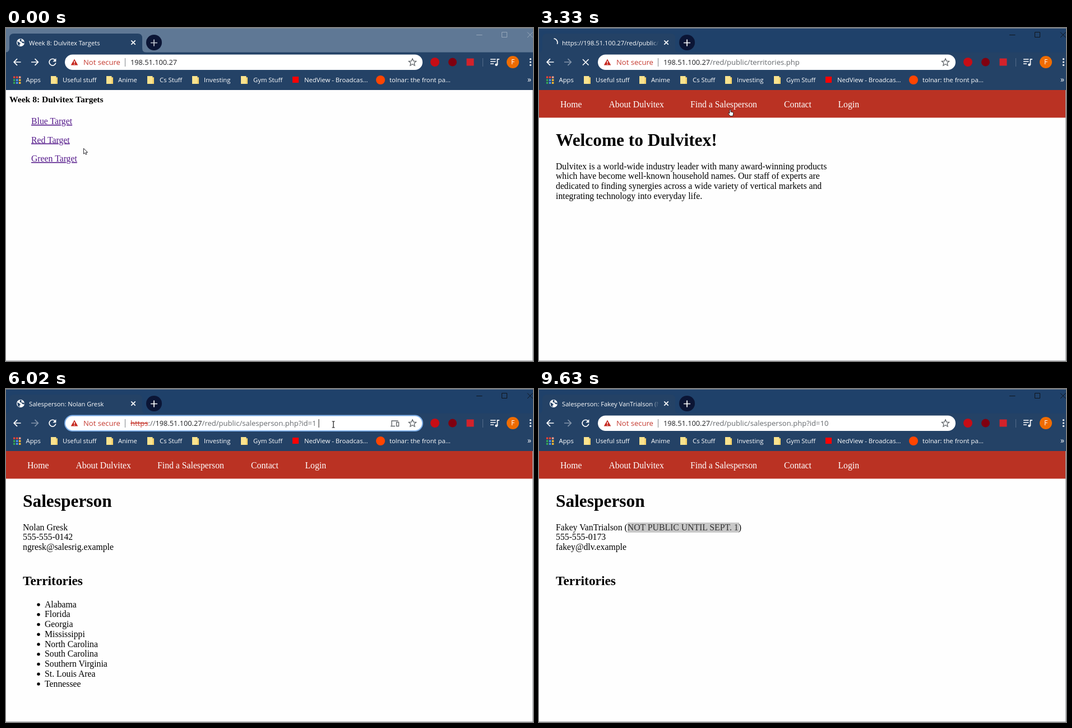
Write an HTML page that moves like this. It is 940x596 px and loops after 9730 ms.

```html
<!DOCTYPE html>
<html lang="en">
<head>
<meta charset="utf-8">
<title>Browser walkthrough</title>
<style>
  html, body { margin: 0; width: 100%; height: 100%; overflow: hidden; background: #fefefe; }
  svg { display: block; width: 100%; height: 100%; }
  text { white-space: pre; }
  .ui { font-family: "Open Sans", "Noto Sans", sans-serif; }
  .page { font-family: "Liberation Serif", "Times New Roman", serif; }
  .line { fill: none; stroke: #fff; stroke-width: 1.7; }
</style>
</head>
<body>
<svg id="stage" viewBox="0 0 940 596"></svg>
<script>
const LOOP = 9730;
const HOST = '198.51.100.27';
const BODY = 15.75, LEADING = 17.75;
const SELLER = 'Nolan Gresk', HIDDEN = 'Fakey VanTrialson';
const HIDDEN_LINE = `${HIDDEN} (NOT PUBLIC UNTIL SEPT. 1)`;

const text = (x, y, size, str, attrs = '') =>
  `<text x="${x}" y="${y}" font-size="${size}" ${attrs}>${str}</text>`;
const rect = (x, y, w, h, fill, attrs = '') =>
  `<rect x="${x}" y="${y}" width="${w}" height="${h}" fill="${fill}" ${attrs}/>`;
const circle = (x, y, r, fill, attrs = '') =>
  `<circle cx="${x}" cy="${y}" r="${r}" fill="${fill}" ${attrs}/>`;
const path = (d, attrs = 'class="line"') => `<path d="${d}" ${attrs}/>`;
const group = (id, content, attrs = '') => `<g id="${id}" ${attrs}>${content}</g>`;
const lines = (x, y, rows) => rows.map((row, i) => text(x, y + i * LEADING, BODY, row)).join('');
const heading = str => text(30, 211, 31.4, str, 'font-weight="bold"');
const link = (x, y, str, color = '#0000ee') =>
  text(x, y, BODY, str, `fill="${color}" text-decoration="underline"`);

// Browser frame
const folders = [[80, 101, 'Useful stuff'], [179, 200, 'Anime'], [252, 274, 'Cs Stuff'],
  [332, 353, 'Investing'], [419, 441, 'Gym Stuff']];
const dotColors = ['#e94335', '#e94335', '#f4a08c', '#34a853', '#4f93f7', '#f9bb2d', '#34a853', '#4f93f7', '#f9bb2d'];

function bookmarks() {
  const apps = dotColors.map((c, i) => rect(13 + i % 3 * 5, 86.5 + Math.floor(i / 3) * 5, 3.4, 3.4, c)).join('');
  const items = folders.map(([ix, tx, name]) =>
    path(`M${ix} 86h9.5v2.5h2.5v11.5h-12z`, 'fill="#fbe38e"') +
    path(`M${ix + 9.5} 88.5h2.5v11.5h-3z`, 'fill="#f3d06b"') + text(tx, 97, 11.3, name)).join('');
  return apps + text(35.5, 97, 11.3, 'Apps') + items +
    rect(511, 87, 11, 11, '#f00') + text(532, 97, 11.3, 'NedView - Broadcas...') +
    circle(668, 93, 8, '#ff4500') + text(684, 97, 11.3, 'tolnar: the front pa...') +
    text(930, 97, 14, '»');
}

function toolbar() {
  return path('M26.5 61H14.5M20 55.2L14.2 61L20 66.8') +
    path('M45 61H57M51.5 55.2L57.3 61L51.5 66.8', 'id="forward" class="line"') +
    group('reload', path('M87.6 57.4A5.9 5.9 0 1 0 88.8 62.4') + path('M89.4 54.3v6h-6z', 'fill="#fff"')) +
    group('stop', path('M78 56l10.500 10.500M88.500 56L78 66.500')) +
    circle(765, 61, 8, '#c70d15') + circle(796.5, 61, 7.5, '#800010') + rect(821.5, 54.5, 13, 13, '#d3222a') +
    rect(850, 54, 1, 15, '#546c8a') +
    path('M864 56h9.500M864 60h9.500M864 64h6M876.500 66V55.800h3.500') + circle(874.6, 65.8, 2.3, '#fff') +
    circle(904, 61, 11, '#ef6c00') + text(904, 65.3, 12, 'F', 'text-anchor="middle"') +
    [55.7, 61, 66.3].map(y => circle(935.5, y, 1.6, '#fff')).join('');
}

function popup() {
  const row = (y, str) => text(138, y, 13.05, str, 'fill="#3c4043"');
  return rect(97, 42, 654, 118, '#fff', 'rx="14" style="filter:drop-shadow(0 2px 3px #0006)"') +
    rect(97, 82, 654, 36, '#e8eaed') + circle(122, 100, 6, '#5f6368') +
    row(104.5, `${HOST}/red/public/salesperson.php?id=10`) +
    circle(121, 135, 4.3, 'none', 'stroke="#5f6368" stroke-width="1.6"') +
    path('M124 138l4 4', 'stroke="#5f6368" stroke-width="1.6"') +
    row(140.5, `${HOST}/red/public/salesperson.php?id=10 - Search`);
}

function addressBar() {
  return rect(105, 47.5, 638, 27.5, '#fff', 'id="bar" rx="13.75"') +
    path('M122 55.500L128.300 66.500H115.700z', 'fill="#c5281f"') +
    rect(121.3, 59, 1.4, 4, '#fff') + rect(121.3, 64, 1.4, 1.4, '#fff') +
    text(138, 66, 13.05, 'Not secure', 'fill="#c53a30"') + rect(212, 54, 1, 15, '#80868b') +
    rect(222, 52, 335, 19, '#3390ff', 'id="urlMark"') +
    '<text id="url" x="222" y="66"></text>' + rect(557.5, 54, 1, 15, '#222', 'id="caret"') +
    group('devices', path('M688 65.500V57h11.500M686 66.500h8M696.500 59.500h4v7h-4z', 'fill="none" stroke="#5f6368" stroke-width="1.4"')) +
    path('M725 54.800l1.900 4.300 4.700.4-3.500 3.100 1 4.600-4.100-2.400-4.100 2.400 1-4.600-3.500-3.100 4.700-.4z',
      'fill="none" stroke="#5f6368" stroke-width="1.3"');
}

function tabStrip() {
  return rect(0, 0, 940, 46, '#5f7895', 'id="strip"') +
    path('M-2 44Q6 44 6 36V18Q6 10 14 10H235Q243 10 243 18V36Q243 44 251 44Z', 'fill="#244266"') +
    group('globe', circle(26, 26, 7, '#fff') +
      path('M20 24l3.500 1.500 2.500 2.500-2 1.500.5 2.700-3.200-2zM25 19.500l3 1-1 2.500 3 1.500 2.500 0 .3 3-3.300-.5-2-2.500-3-1z', 'fill="#244266"')) +
    path('', 'id="spinner" class="line"') +
    `<clipPath id="tabClip">${rect(40, 12, 173, 30, '#000')}</clipPath>` +
    text(41, 30.5, 11.2, '', 'id="tab" fill="#fff" clip-path="url(#tabClip)"') +
    '<linearGradient id="fade"><stop stop-color="#244266" stop-opacity="0"/><stop offset="1" stop-color="#244266"/></linearGradient>' +
    rect(200, 14, 14, 24, 'url(#fade)') +
    path('M223.300 22.300l7.400 7.400M230.700 22.300l-7.400 7.400', 'class="line"') +
    circle(264, 26, 14, '#0b1535') + path('M258 26.500h12M264 20.500v12', 'id="plus" class="line"') +
    path('M839 12.500h10.500M884.500 7.500h9v9h-9zM930 7.500l9.500 9.500M939.500 7.500l-9.500 9.500', 'id="buttons" fill="none"');
}

// Page contents
function targets() {
  return text(6, 133, 15.6, 'Week 8: Dulvitex Targets', 'font-weight="bold"') +
    ['Blue', 'Red', 'Green'].map((c, i) => link(45, 172 + 33.5 * i, c + ' Target', '#551a8b')).join('');
}

function nav() {
  const items = [[38, 'Home'], [124.5, 'About Dulvitex'], [270, 'Find a Salesperson'], [437, 'Contact'], [533.5, 'Login']];
  return rect(0, 111, 939, 49.5, '#ba3223') +
    items.map(([x, name]) => text(x, 142.3, BODY, name, 'fill="#fff"')).join('');
}

function home() {
  return heading('Welcome to Dulvitex!') + lines(30, 252.5, [
    'Dulvitex is a world-wide industry leader with many award-winning products',
    'which have become well-known household names. Our staff of experts are',
    'dedicated to finding synergies across a wide variety of vertical markets and',
    'integrating technology into everyday life.']);
}

function territories() {
  const square = y => rect(55.3, y - 7, 5.3, 5.3, '#000');
  const states = [['Alabama (AL)', SELLER], ['Alaska (AK)', 'Gerald Fostwind'],
    ['Arizona (AZ)', 'Clara Tovnil'], ['Arkansas (AR)', 'Philippa Renwo']];
  const regions = [['Northern California', 'Gerald Fostwind'], ['Southern California', 'Joanna Kestrin']];
  return heading('Find a Salesperson') +
    lines(30, 252.5, ['Use the list below to find a salesperson nearby. We are ready to serve you!']) +
    text(30, 286.3, BODY, 'UNITED STATES', 'font-weight="bold"') +
    states.map(([state, name], i) => {
      const y = 319.7 + 51.3 * i;
      return text(30, y, BODY, state) + square(y + LEADING) + link(69, y + LEADING, name);
    }).join('') + text(30, 525, BODY, 'California (CA)') +
    regions.map(([region, name], i) => {
      const y = 542.7 + 2 * LEADING * i;
      return square(y) + text(69, y, BODY, region) + link(69, y + LEADING, name);
    }).join('');
}

function person(details, areas) {
  return heading('Salesperson') + lines(30, 252.5, details) +
    text(30, 351, 23.4, 'Territories', 'font-weight="bold"') + lines(69, 390.7, areas) +
    areas.map((_, i) => circle(58, 386 + LEADING * i, 2.7, '#000')).join('');
}

const pages = {
  targets: targets(),
  home: home(),
  list: territories(),
  seller: person([SELLER, '555-555-0142', 'ngresk@salesrig.example'],
    ['Alabama', 'Florida', 'Georgia', 'Mississippi', 'North Carolina', 'South Carolina',
      'Southern Virginia', 'St. Louis Area', 'Tennessee']),
  hidden: person([HIDDEN_LINE, '555-555-0173', 'fakey@dlv.example'], []) +
    `<clipPath id="markClip">${rect(158, 239, 0, 18, '#000', 'id="markArea"')}</clipPath>` +
    group('marked', rect(158, 239, 199, 18, '#3390ff', 'id="markFill"') +
      text(30, 252.5, BODY, HIDDEN_LINE, 'id="markText"'), 'clip-path="url(#markClip)"')
};

const outline = 'fill="#fff" stroke="#16161c" stroke-width=".9" stroke-linejoin="round"';
const cursors = {
  arrow: path('M.5.500V10.300L2.800 8.300 4.300 11.600 6 10.800 4.600 7.600H7.600z', outline),
  hand: path('M3 1Q4 0 5 1V5L9 6Q10 6.500 9.700 8L8.700 12.500H4L.8 8.300Q.5 6.800 2 7L3 8z', outline),
  ibeam: path('M-2.500-5.500H2.500M0-5.500V5.500M-2.500 5.500H2.500', 'fill="none" stroke="#111" stroke-width="1.2"')
};

const stage = document.getElementById('stage');
stage.innerHTML =
  rect(0, 0, 940, 596, '#fefefe') +
  group('pages', group('nav', nav()) + Object.entries(pages).map(([id, body]) => group('page-' + id, body)).join(''), 'class="page"') +
  group('frame', tabStrip() + rect(0, 43.5, 940, 67.5, '#244266') + toolbar() + bookmarks() +
    group('popup', popup()) + addressBar(), 'class="ui" fill="#fff"') +
  rect(0, 0, 940, 1, '#7d8894') + rect(939, 111, 1, 485, '#a5a9ad') + rect(0, 595, 940, 1, '#a5a9ad') +
  Object.entries(cursors).map(([id, shape]) => group('cursor-' + id, shape)).join('');

const $ = id => document.getElementById(id);
const show = (id, on) => { $(id).style.display = on ? '' : 'none'; };
const set = (id, attrs) => { for (const k in attrs) $(id).setAttribute(k, attrs[k]); };

// Timeline: each entry holds until the next one
const loadingTab = `https://${HOST}/red/public/`;
const salesPath = '/red/public/salesperson.php?id=1';
const steps = [
  [0, { page: 'targets', tab: 'Week 8: Dulvitex Targets', path: '', active: false, load: null, bar: 'idle', mark: '#3390ff' }],
  [840, { active: true }],
  [980, { load: 980, tab: loadingTab, path: '/red/public/' }],
  [1120, { load: null, tab: 'Dulvitex', page: 'home' }],
  [3030, { load: 3030, tab: loadingTab, path: '/red/public/territories.php' }],
  [3450, { load: null, tab: 'Find a Salesperson', page: 'list' }],
  [4490, { load: 4490, tab: loadingTab, path: salesPath }],
  [4780, { load: null, tab: 'Salesperson: ' + SELLER, page: 'seller' }],
  [5060, { bar: 'hover' }],
  [5340, { bar: 'selected' }],
  [6020, { bar: 'edit' }],
  [6550, { bar: 'popup', path: salesPath + '0' }],
  [7110, { bar: 'idle', load: 7110, tab: loadingTab }],
  [7390, { load: null, tab: `Salesperson: ${HIDDEN} (NOT`, page: 'hidden' }],
  [9630, { mark: '#c8c8c8' }]
];

// Pointer moves: first hop, last hop, hop count, destination, shape
const moves = [
  [0, 0, 1, 138, 215, 'arrow'], [150, 150, 1, 89, 198, 'hand'],
  [1120, 1270, 2, 330, 359, 'arrow'], [1410, 1550, 2, 473.5, 324, 'arrow'],
  [1950, 2640, 6, 345, 160, 'arrow'], [2773, 2773, 1, 338, 139, 'hand'], [2910, 2910, 1, 337, 145, 'hand'],
  [3450, 3970, 5, 154, 343, 'arrow'], [4090, 4220, 2, 129, 332, 'hand'],
  [4640, 4640, 1, 577, 182, 'arrow'], [4780, 4920, 2, 585, 120, 'arrow'], [5060, 5060, 1, 584, 63.5, 'ibeam'],
  [6550, 6550, 1, 584, 63.5, 'none'], [7390, 7650, 3, 427.5, 173, 'arrow'],
  [7800, 7800, 1, 505, 215, 'arrow'], [7950, 7950, 1, 400, 230, 'arrow'], [8090, 8090, 1, 157.5, 248, 'ibeam'],
  [8220, 8635, 4, 357, 248, 'ibeam'], [8775, 9190, 4, 558, 410, 'arrow'], [9340, 9340, 1, 558, 410, 'none']
];

function pointerAt(t) {
  let i = moves.length - 1;
  while (moves[i][0] > t) i--;
  const [start, end, count, x, y, kind] = moves[i];
  const [, , , px, py] = moves[Math.max(0, i - 1)];
  const hop = count === 1 ? 1 : Math.min(count, 1 + Math.floor((t - start) / (end - start) * (count - 1)));
  const k = hop / count, ease = k * k * (3 - 2 * k);
  return { x: px + (x - px) * ease, y: py + (y - py) * ease, kind };
}

function urlMarkup(state) {
  const span = (str, size, fill, extra = '') => `<tspan font-size="${size}" fill="${fill}" ${extra}>${str}</tspan>`;
  const selected = state.bar === 'selected', editing = selected || state.bar === 'edit';
  const tint = color => selected ? '#fff' : color;
  const scheme = editing ? span('https', 13.05, tint('#c5352b'), 'text-decoration="line-through"') +
    span('://', 13.05, tint('#5f6368')) : '';
  return scheme + span(HOST, 12.75, tint('#202124')) + span(state.path, 13.05, tint('#666a6e'));
}

function spinnerPath(elapsed) {
  const hop = Math.floor(elapsed / 145), from = -1.5, to = from + 0.7 + 0.6 * hop;
  const point = a => `${26 + 7 * Math.cos(a)} ${26 + 7 * Math.sin(a)}`;
  return `M${point(from)}A7 7 0 0 1 ${point(to)}`;
}

let lastUrl;
function draw(t) {
  const s = Object.assign({}, ...steps.filter(([at]) => at <= t).map(([, change]) => change));
  const focused = ['selected', 'edit', 'popup'].includes(s.bar);
  const loading = s.load !== null;

  for (const id in pages) show('page-' + id, id === s.page);
  show('nav', s.page !== 'targets');
  set('strip', { fill: s.active ? '#1f416a' : '#5f7895' });
  set('buttons', { stroke: s.active ? '#10151c' : '#98a8ba' });
  set('plus', { style: `stroke:${s.active ? '#fff' : '#c5cad3'}` });
  set('forward', { style: `stroke:${s.path ? '#8294aa' : '#fff'}` });
  $('tab').textContent = s.tab;
  show('globe', !loading);
  show('spinner', loading);
  show('reload', !loading);
  show('stop', loading);
  if (loading) set('spinner', { d: spinnerPath(t - s.load) });

  const ring = s.bar === 'selected' || s.bar === 'edit';
  set('bar', { fill: s.bar === 'hover' ? '#f1f3f4' : '#fff', stroke: ring ? '#7fb0ea' : 'none', 'stroke-width': 2 });
  show('devices', focused);
  show('popup', s.bar === 'popup');
  show('urlMark', s.bar === 'selected');
  show('caret', s.bar === 'edit');
  const url = urlMarkup(s);
  if (url !== lastUrl) $('url').innerHTML = lastUrl = url;

  const p = pointerAt(t);
  for (const id in cursors) show('cursor-' + id, id === p.kind);
  if (cursors[p.kind]) set('cursor-' + p.kind, { transform: `translate(${p.x} ${p.y})` });

  const markEnd = t < 8220 ? 158 : t < 8775 ? p.x : 357;
  set('markArea', { width: Math.max(0, markEnd - 158) });
  set('markFill', { fill: s.mark });
  set('markText', { fill: s.mark === '#c8c8c8' ? '#323232' : '#fff' });
}

function tick() {
  draw(performance.now() % LOOP);
  requestAnimationFrame(tick);
}
tick();
</script>
</body>
</html>
```
